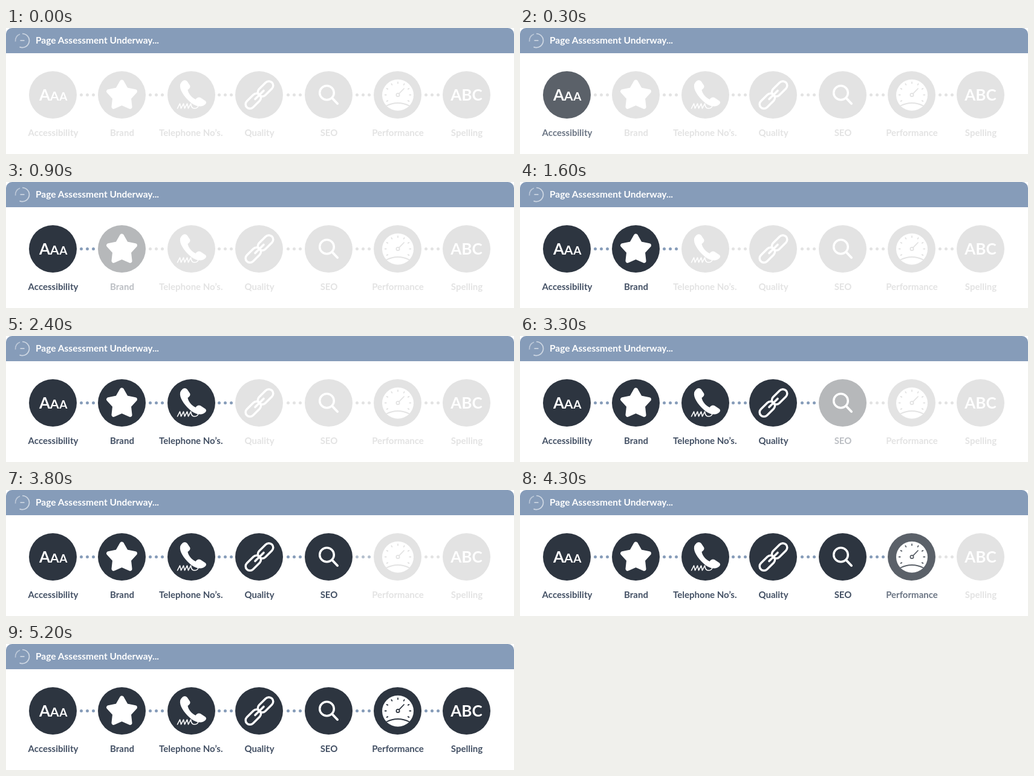
An HTML page for the animation above (7.3 s loop, 840x210 px).

```html
<!DOCTYPE html>
<html lang="en">
<head>
<meta charset="utf-8">
<title>Page assessment</title>
<style>
  html, body { margin: 0; width: 100%; height: 100%; overflow: hidden; background: #fff; }
  svg { display: block; width: 840px; height: 210px; }
  text { font-family: Lato, "Open Sans", sans-serif; font-weight: 700; }
  .label { font-size: 15px; text-anchor: middle; fill: currentColor; }
  .disc, .dots { fill: currentColor; }
  .mark { fill: #fff; stroke: none; }
  .line { fill: none; stroke: #fff; stroke-linecap: round; stroke-linejoin: round; }
  .cut { fill: none; stroke: currentColor; stroke-width: 1.8; stroke-linecap: round; }
</style>
</head>
<body>
<svg id="stage" viewBox="0 0 840 210" xmlns="http://www.w3.org/2000/svg">
  <path d="M0 42V10A10 10 0 0 1 10 0H830A10 10 0 0 1 840 10V42Z" fill="#869cb9"/>
  <g fill="none" stroke="#fff" stroke-width="1.7" opacity=".6">
    <path d="M27 9.5A11.5 11.5 0 1 1 22.5 31.6"/>
    <path d="M15.6 22.5A11.5 11.5 0 0 1 23 10.2" opacity=".75"/>
    <path d="M23.5 20.8H30.5"/>
  </g>
  <text x="49" y="26" font-size="15.5" fill="#fff">Page Assessment Underway...</text>
</svg>
<script>
const LOOP = 7300, STEP = 100, LEVELS = 4, CY = 111.5;
const OFF = [227, 227, 227];
const DARK = [45, 53, 64], INK = [67, 80, 100], BLUE = [134, 156, 185];
const stage = document.getElementById('stage');

const polar = (r, deg) => {
  const a = deg * Math.PI / 180;
  return [(r * Math.cos(a)).toFixed(2), (r * Math.sin(a)).toFixed(2)];
};

// Icons are drawn around the centre of their disc.
function letters() {
  return [[-22.5, 26], [-4.7, 21.5], [10.7, 19]]
    .map(([x, size]) => `<text class="mark" x="${x}" y="9.5" font-size="${size}">A</text>`).join('');
}

function star() {
  const pts = Array.from({ length: 10 }, (_, i) => polar(i % 2 ? 12.5 : 23, i * 36 - 90));
  return `<polygon class="line" style="fill:#fff" stroke-width="7" transform="translate(0 1.3)" points="${pts.join(' ')}"/>`;
}

function phone() {
  return `<path class="mark" d="M-15.5 -22C-12.5 -25.5 -8.5 -25 -6.5 -22L-2.5 -16C-1 -13 -3 -10.5 -6 -8.5
      C-5 -2 1 5 7 7.5C9 4.5 12 3 15 4.5L22.5 9.5C25.5 11.5 25 14.500 22 16.500C15 21.500 5.500 19 -3.500 10.500
      C-12.500 2 -20 -9 -18.500 -17C-18 -19 -17 -21 -15.500 -22Z"/>
    <path class="line" stroke-width="1.6" d="M-23 22.500L-19 14.500L-17 22.500L-13 14.500L-11 22.500L-7 14.500L-5 22.500L-1 14.500
      C0 20 1 22.500 5 22.500C9.500 22.500 12 20 11.500 15.500"/>`;
}

function chain() {
  const link = x => `<rect class="line" x="${x - 15}" y="-7.2" width="30" height="14.4" rx="7.2"/>`;
  return `<g transform="translate(.5 0) rotate(-45)" stroke-width="3.5">
    ${link(-14.3)}${link(14.3)}<path class="line" d="M-10 0H10"/></g>`;
}

function lens() {
  return `<circle class="line" cx="-3" cy="-3.5" r="11.8" stroke-width="3.5"/>
    <path class="line" stroke-width="4" d="M6 5.500L14.500 14.500"/>`;
}

function gauge() {
  let ticks = '';
  for (let a = -210; a <= 30; a += 30) ticks += `M${polar(19.3, a)}L${polar(21.3, a)}`;
  return `<circle class="mark" cx=".5" cy=".3" r="26"/>
    <path class="cut" transform="translate(.5 0)" d="${ticks}"/>
    <circle class="cut" cx=".5" r="2.6"/>
    <path class="cut" d="M2.500 -2.200L10.500 -10.500M-19 18.500Q.5 8.500 20 18.500"/>`;
}

function abc() {
  return '<text class="mark" y="9" font-size="26" text-anchor="middle">ABC</text>';
}

const items = [
  [77.5, 'Accessibility', letters],
  [191.5, 'Brand', star],
  [306.5, 'Telephone No’s.', phone, 305.8],
  [418.5, 'Quality', chain],
  [533.5, 'SEO', lens],
  [647.5, 'Performance', gauge],
  [761.5, 'Spelling', abc]
];

function group(html) {
  const g = document.createElementNS('http://www.w3.org/2000/svg', 'g');
  g.innerHTML = html;
  return stage.appendChild(g);
}

// Four hard colour steps, then hold until the loop restarts.
function fade(el, start, to) {
  const mix = k => `rgb(${OFF.map((c, i) => Math.round(c + (to[i] - c) * k))})`;
  const frames = [{ offset: 0, color: mix(0), easing: 'step-end' }];
  for (let i = 0; i < LEVELS; i++) {
    frames.push({ offset: (start + i * STEP) / LOOP, color: mix((i + 1) / LEVELS), easing: 'step-end' });
  }
  frames.push({ offset: 1, color: mix(1) });
  el.animate(frames, { duration: LOOP, iterations: Infinity });
}

items.forEach(([x, name, icon, labelX = x + 0.5], n) => {
  const start = STEP + n * 2 * LEVELS * STEP;
  const badge = group(`<g transform="translate(${x} ${CY})"><circle class="disc" r="39.5"/>${icon()}</g>`);
  const label = group(`<text class="label" x="${labelX}" y="180">${name}</text>`);
  fade(badge, start, DARK);
  fade(label, start, INK);
  if (n < items.length - 1) {
    const dots = [0, 10, 20].map(d => `<circle class="dots" cx="${124.5 + n * 114 + d}" cy="${CY}" r="2.5"/>`);
    fade(group(dots.join('')), start + LEVELS * STEP, BLUE);
  }
});
</script>
</body>
</html>
```
